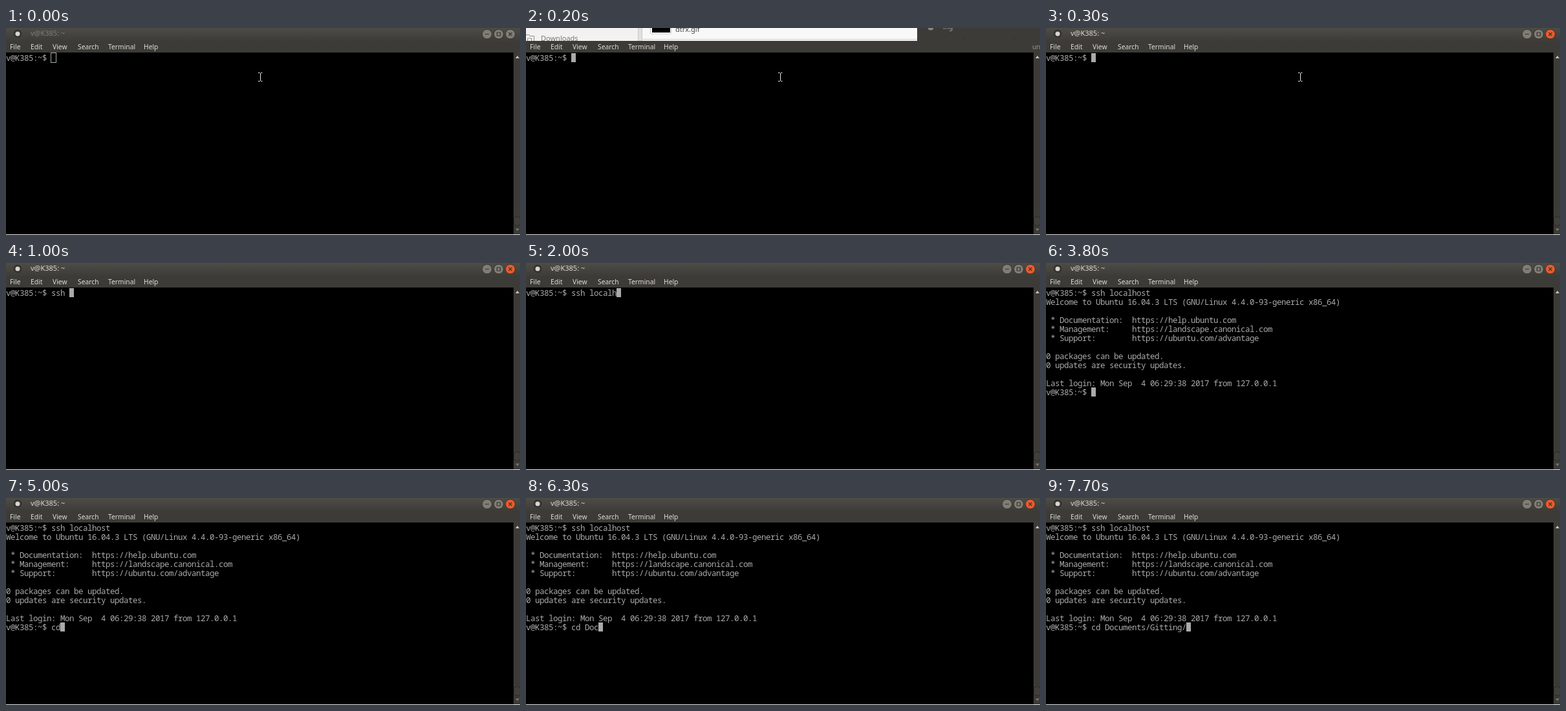
An HTML page that plays this animation: 795x321 px, repeating every 8 s.

```html
<!DOCTYPE html>
<html lang="en">
<head>
<meta charset="utf-8">
<title>Terminal session</title>
<style>
html, body { margin: 0; width: 100%; height: 100%; overflow: hidden; background: #000; }
svg { display: block; width: 795px; height: 321px; }
text { white-space: pre; }
.term text { font: 12.5px "Noto Sans Mono", "DejaVu Sans Mono", monospace; letter-spacing: -0.5px; fill: #aaa; }
.ui { font: 10.3px "Noto Sans", "Open Sans", sans-serif; fill: #dfdbd2; }
.title { font-size: 11px; }
</style>
</head>
<body>
<svg viewBox="0 0 795 321">
  <defs>
    <linearGradient id="bar" x2="0" y2="1">
      <stop offset="0" stop-color="#4d4c47"/>
      <stop offset="1" stop-color="#3d3c38"/>
    </linearGradient>
    <clipPath id="strip"><rect width="795" height="20"/></clipPath>
  </defs>

  <rect width="795" height="321" fill="#000"/>
  <g class="term" id="term"></g>
  <rect id="cursor" width="7" height="14" fill="#aaa"/>
  <rect id="hollow" x="69.5" y="38.5" width="8" height="15" fill="none" stroke="#aaa"/>

  <!-- menu bar -->
  <rect y="20" width="795" height="18" fill="#3c3b37"/>
  <g class="ui" id="menu"></g>

  <!-- scroll bar -->
  <rect x="785" y="38" width="10" height="282" fill="#3c3b37"/>
  <path d="M788 47h6l-3-4z" fill="#c8c5bd"/>
  <path d="M788 311h6l-3 4z" fill="#77746d"/>
  <rect x="785.5" y="292.5" width="10" height="14" rx="4" fill="#403f3a" stroke="#2b2a27"/>
  <rect y="320" width="795" height="1" fill="#e6e6e6"/>

  <!-- title bar -->
  <g id="titlebar">
    <rect width="795" height="20" fill="url(#bar)"/>
    <circle cx="18" cy="9" r="6.5" fill="#35342f"/>
    <circle cx="18" cy="9" r="3.5" fill="#d8d5cd"/>
    <text id="title" class="ui title" x="38" y="12">v@K385: ~</text>
    <g stroke="#34332e">
      <circle cx="744" cy="9.5" r="7.5" fill="#807d75"/>
      <circle cx="762" cy="9.5" r="7.5" fill="#807d75"/>
      <circle id="close" cx="780" cy="9.5" r="7.5"/>
      <path d="M741 9.5h6M759.5 7h5v5h-5zM777.5 7l5 5m0-5l-5 5" fill="none" stroke-width="1.2"/>
    </g>
  </g>

  <!-- windows briefly seen behind the title bar -->
  <g id="behind" clip-path="url(#strip)">
    <rect width="605" height="20" fill="#f3f2f1"/>
    <rect x="173" width="7" height="20" fill="#e2e0de"/>
    <path d="M173.5 0v20M179.5 0v20" stroke="#cbc8c4"/>
    <rect x="180" width="425" height="18" fill="#f8f8f8"/>
    <rect x="180" y="17" width="425" height="1" fill="#d5d3d0"/>
    <path d="M0 10.5h5l1 2h6.500v8H0M2.500 20v-4h6v4" fill="none" stroke="#8d9084"/>
    <text class="ui title" x="23" y="20" style="fill:#777">Downloads</text>
    <rect x="192.500" y="-5" width="32" height="14" rx="2" fill="#fff" stroke="#c4c4c4"/>
    <rect x="195" width="28" height="7" fill="#000"/>
    <text class="ui title" x="231" y="6" style="fill:#444">dtrx.gif</text>
    <rect x="605" width="190" height="20" fill="#3c3b37"/>
    <circle cx="626" cy="-1" r="4.500" fill="#8a8881"/>
    <text class="ui" x="645" y="2" style="fill:#a5a29b">ing</text>
    <path d="M676.500 14v6M755.500 14v6" stroke="#34332f"/>
  </g>
  <text id="stray" class="ui" x="783" y="33" style="fill:#98958e">un</text>

  <path id="pointer" d="M390 69.500h2.500l1 1 1-1h2M393.500 70v12M390 82.500h2.500l1-1 1 1h2" fill="none" stroke="#e8e8e8"/>
</svg>
<script>
const LOOP = 8000, CELL = 7, ROW = 14, TOP = 39;
const PROMPT = "v@K385:~$ ";
const COLS = 10;
const SSH = "ssh localhost", CD = "cd Documents/Gitting/";

// [time, characters shown]
const sshKeys = [[600, 1], [700, 2], [900, 3], [1000, 4], [1400, 5], [1600, 6], [1700, 7],
  [1800, 9], [2000, 10], [2100, 11], [2200, 12], [2400, 13]];
const cdKeys = [[4800, 1], [5000, 2], [5700, 3], [6100, 4], [6200, 5], [6300, 6],
  [6600, 13], [7400, 14], [7700, 21]];
const blinkOff = [[3200, 3800], [4400, 4800], [5500, 5700], [7200, 7400]];

const welcome = [
  "Welcome to Ubuntu 16.04.3 LTS (GNU/Linux 4.4.0-93-generic x86_64)",
  "",
  " * Documentation:  https://help.ubuntu.com",
  " * Management:     https://landscape.canonical.com",
  " * Support:        https://ubuntu.com/advantage",
  "",
  "0 packages can be updated.",
  "0 updates are security updates.",
  "",
  "Last login: Mon Sep  4 06:29:38 2017 from 127.0.0.1"
];

const el = id => document.getElementById(id);
const show = (id, on) => el(id).setAttribute("visibility", on ? "visible" : "hidden");

function addText(parent, x, y, str = "") {
  const t = document.createElementNS("http://www.w3.org/2000/svg", "text");
  t.setAttribute("x", x);
  t.setAttribute("y", y);
  t.textContent = str;
  el(parent).append(t);
  return t;
}

[["File", 6], ["Edit", 38], ["View", 72], ["Search", 111], ["Terminal", 158], ["Help", 213]]
  .forEach(([name, x]) => addText("menu", x, 33, name));
const rows = Array.from({ length: 12 }, (_, i) => addText("term", 0, TOP + 12 + i * ROW));

const typed = (keys, t) => keys.reduce((n, [at, count]) => t >= at ? count : n, 0);

function cursorAt(t) {
  if (t < 2600) return [COLS + typed(sshKeys, t), 0];
  if (t < 2900) return [0, 1];
  if (t < 3000) return [0, 11];
  return [COLS + typed(cdKeys, t), 11];
}

function draw(t) {
  const focused = t >= 200, exposed = t >= 200 && t < 300;
  show("titlebar", !exposed);
  show("behind", exposed);
  show("stray", exposed);
  show("pointer", t < 500);
  el("title").style.fill = focused ? "#dfdbd2" : "#807d78";
  el("close").setAttribute("fill", focused ? "#ea5b2d" : "#807d75");

  rows[0].textContent = PROMPT + SSH.slice(0, typed(sshKeys, t));
  welcome.forEach((line, i) => rows[i + 1].textContent = t >= 2900 ? line : "");
  rows[11].textContent = t >= 3000 ? PROMPT + CD.slice(0, typed(cdKeys, t)) : "";

  const [col, row] = cursorAt(t);
  el("cursor").setAttribute("x", col * CELL);
  el("cursor").setAttribute("y", TOP + row * ROW);
  show("cursor", focused && !blinkOff.some(([a, b]) => t >= a && t < b));
  show("hollow", !focused);
}

const start = performance.now();
function tick() {
  draw((performance.now() - start) % LOOP);
  requestAnimationFrame(tick);
}
tick();
</script>
</body>
</html>
```
